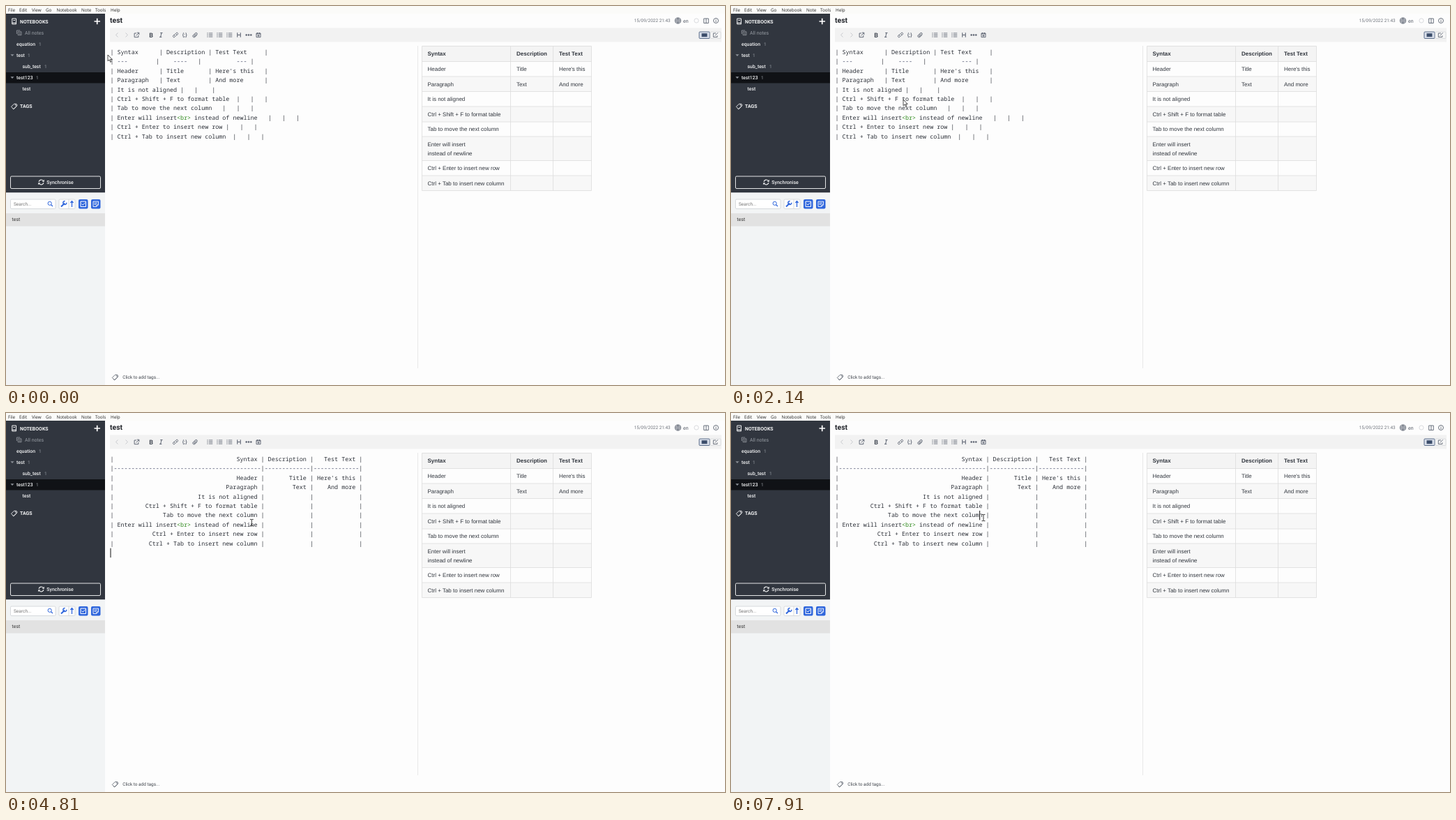
These frames come from a looping animation (1031x543 px, 8 s). An HTML page:

```html
<!DOCTYPE html>
<html lang="en">
<head>
<meta charset="utf-8">
<title>Table formatting</title>
<style>
html, body { margin: 0; width: 100%; height: 100%; overflow: hidden; background: #fdfdfd; }
svg { display: block; width: 1031px; height: 543px; }
text { white-space: pre; text-rendering: geometricPrecision; }
.ui { font-family: Roboto, sans-serif; }
.menu { font-family: "Open Sans", sans-serif; }
.cell { font-family: "Liberation Sans", Arial, sans-serif; }
.code { font-family: "Noto Sans Mono", "Liberation Mono", monospace; }
</style>
</head>
<body>
<svg id="stage" viewBox="0 0 1031 543" xmlns="http://www.w3.org/2000/svg"></svg>
<script>
const LOOP = 8000;
const CHAR = 5.04, LINE = 13.44, LEFT = 149.5, TOP = 66;
const INK = '#2c3038', ICON = '#5b6270', BLUE = '#2f66dc';

const escape = s => s.replace(/&/g, '&amp;').replace(/</g, '&lt;').replace(/>/g, '&gt;');
const rect = (x, y, w, h, fill, more = '') =>
  `<rect x="${x}" y="${y}" width="${w}" height="${h}" fill="${fill}" ${more}/>`;
const line = (d, color, width = 1, more = '') =>
  `<path d="${d}" fill="none" stroke="${color}" stroke-width="${width}" ${more}/>`;
const shape = (d, fill) => `<path d="${d}" fill="${fill}"/>`;
const circle = (x, y, r, color, width = 0.8) =>
  `<circle cx="${x}" cy="${y}" r="${r}" fill="none" stroke="${color}" stroke-width="${width}"/>`;
const label = (s, x, y, size, fill, kind = 'ui', weight = 400) =>
  `<text x="${x}" y="${y}" class="${kind}" font-size="${size}" font-weight="${weight}" fill="${fill}">${escape(s)}</text>`;
const at = (x, y, body, scale = 1) => `<g transform="translate(${x} ${y}) scale(${scale})">${body}</g>`;

const tagIcon = color =>
  line('M-4 .5 0-3.5H3.5V0L-.5 4Z', color, 0.9) +
  line('M-2.2 2.6-1 4 4.5-1.2V-2.5', color, 0.8) + `<circle cx="1.9" cy="-1.9" r=".7" fill="${color}"/>`;
const bookIcon = color =>
  line('M-2.7-4H3V4H-2.7Z', color, 1) + line('M-3 2.2H3M-1-1.5H1.5', color, 1);
const syncIcon = color =>
  line('M-3.4-.6A3.5 3.5 0 0 1 3-1.8M3.4 .6A3.5 3.5 0 0 1-3 1.8', color, 1.1) +
  shape('M4.3-3.8V-.8H1.3ZM-4.3 3.8V.8H-1.3Z', color);

function menuBar() {
  const items = { File: 3, Edit: 19, View: 37, Go: 57, Notebook: 72.5, Note: 108, Tools: 128, Help: 150 };
  return rect(0, 0, 1031, 11, '#fbfbf9') +
    Object.entries(items).map(([s, x]) => label(s, x, 7.6, 6.3, '#222', 'menu')).join('');
}

function sidebar() {
  const white = '#f2f3f4', grey = '#989da4';
  const item = (s, x, y, count) => label(s, x, y, 6.9, white, 'ui', 500) +
    (count ? label('1', count, y + .1, 6.5, grey) : '');
  const fold = y => shape(`M6.5 ${y - 1.3}H11.5L9 ${y + 1.5}Z`, '#8d929a');
  return rect(0, 11, 142, 256.5, '#31363f') + rect(0, 95, 142, 15.5, '#101216') +
    at(11.5, 22, bookIcon(white)) + label('NOTEBOOKS', 20, 24.5, 7, white, 'ui', 700) +
    line('M126.5 22H135M130.7 17.8V26.2', '#fff', 1.7) +
    at(18.7, 38.5, line('M-1.5-1.7H3.3V3.2H-1.5ZM-3.3 1.5V-3.5H1.5M0 .2H2M0 1.7H2', grey, .8)) +
    label('All notes', 27, 41, 7, grey) +
    item('equation', 15, 57, 47) + fold(70.5) + item('test', 15, 73, 31) +
    item('sub_test', 23.5, 89, 55) + fold(102.5) + item('test123', 15, 105, 43) + item('test', 23.5, 121) +
    at(11.5, 143.8, tagIcon(white)) + label('TAGS', 20, 146.3, 7, white, 'ui', 700) +
    rect(6.5, 244, 129, 17.5, 'none', 'rx="1.5" stroke="#e4e5e6"') +
    at(50.5, 252.5, syncIcon(white)) + label('Synchronise', 58.3, 255.1, 7, white, 'ui', 500);
}

function noteList() {
  const border = 'stroke="#cfd2d6" stroke-width=".8" rx="1.5"';
  return rect(0, 267.5, 142, 275.5, '#f2f4f5') + rect(0, 297, 142, 18.5, '#e2e2e2') +
    rect(6.5, 277, 64.5, 13.5, '#fff', border) + label('Search...', 11, 286, 6.5, '#777') +
    circle(62.7, 282.8, 2.6, BLUE, 1) + line('M64.6 284.7 67 287', BLUE, 1.2) +
    rect(76, 277, 23, 13.5, '#fff', border) + line('M90 277V290.5', '#cfd2d6', .8) +
    line('M79 287.5 84.2 282.5', BLUE, 2) +
    line('M86.8 281.8A2.5 2.5 0 1 1 84.6 279.5', BLUE, 1.5) +
    line('M94.5 288V280M92.4 282 94.5 279.6 96.6 282', BLUE, 1.3) +
    rect(104, 277, 13.5, 13.5, BLUE, 'rx="2"') + rect(122, 277, 13.5, 13.5, BLUE, 'rx="2"') +
    line('M107 280H114.5V287.5H107ZM108.7 283.5 110.3 285.2 113.5 281.8', '#fff', 1) +
    line('M125 280H132.5V284.8L129.8 287.5H125ZM126.5 282.3H131M126.5 284.3H129M129.8 287.3V284.8H132.3', '#fff', .9) +
    label('test', 8.5, 308.3, 6.9, '#333');
}

function header() {
  return label('test', 149, 24.4, 10.4, '#22252b', 'ui', 700) +
    label('15/09/2022 21:43', 900.7, 23.2, 6.46, '#70757d') +
    at(963.5, 21, circle(0, 0, 4.1, ICON, .9) +
      line('M-4 0H4M0-4V4M-3.5-2H3.5M-3.5 2H3.5M0-4C-2.8-1-2.8 1 0 4C2.8 1 2.8-1 0-4', ICON, .7)) +
    label('en', 971, 23.5, 7, '#555b66') + circle(990, 21, 3.1, '#dadcdf', 1) +
    line('M1000.7 18H1007.3V24.5H1000.7ZM1004 18V24.5', ICON, .9) +
    circle(1018, 21, 3.5, ICON, .9) + line('M1018 20.4V23M1018 18.8V19.6', ICON, .9);
}

function toolbar() {
  const faint = '#c4c7cb', y = 41.5;
  const icon = (x, d, color = ICON, w = .95) => at(x, y, line(d, color, w));
  const bullets = x => icon(x, 'M-1.5-2.5H4M-1.5 0H4M-1.5 2.5H4') +
    icon(x, 'M-4-2.5H-2.7M-4 0H-2.7M-4 2.5H-2.7', ICON, 1.2);
  return rect(149, 31.5, 877, 20, '#f2f2f2') +
    icon(159, 'M1.5-3-1.5 0 1.5 3', faint) + icon(173, 'M-1.5-3 1.5 0-1.5 3', faint) +
    icon(187.3, 'M-.3-2.5H-3.2V3.2H2.5V.5M.5-3.3H3.5V-.3M3.3-3-.8 1') +
    label('B', 205.3, 44.8, 9, '#444a55', 'ui', 700) +
    at(222.3, y, line('M-1-3H2.2M-2.2 3H1M.7-3-.7 3', ICON, 1)) +
    icon(243, 'M-.8 1.4C-2.4 1-1.6-.4-.8-1L1-2.8C3-4.3 4.5-1.8 3-.7L2 .4M.8-1.4C2.4-1 1.6.4.8 1L-1 2.8C-3 4.3-4.5 1.8-3 .7L-2-.4') +
    label('{;}', 252.8, 44, 7.6, ICON, 'ui', 500) +
    icon(271, 'M3.3-.4-.2 3C-2.4 4.4-4.2 1.8-2.7.3L.7-2.8C2.3-4 4-2 2.7-.7L-.4 2C-1.5 2.5-2 1.5-1.2.7L1.3-1.6') +
    bullets(292.3) + bullets(306.3) + bullets(320.3) +
    icon(334, 'M-2.2-3.2V3.2M2.2-3.2V3.2M-2.2 0H2.2', ICON, 1.1) +
    [344.7, 348, 351.3].map(x => `<circle cx="${x}" cy="${y}" r="1.3" fill="${ICON}"/>`).join('') +
    icon(362, 'M-3-2.5H3V3.2H-3ZM-3-1.5H3M-1.5-3.5V-2M1.5-3.5V-2M-1.5 1H1.5M0-.5V2.5') +
    rect(994, 37, 15, 9.5, '#dbe1ec', 'rx="1" stroke="#4d607f" stroke-width=".9"') +
    rect(997.5, 39.2, 8, 5, '#3c4e6b') +
    rect(1010, 37, 15, 9.5, '#f7f7f7', 'rx="1" stroke="#d4d6d9" stroke-width=".8"') +
    at(1017.5, y, line('M.5-2.5H-3.2V3H2.4V.8M-1 1.2 3.4-3.2', ICON, .9));
}

function preview() {
  const edges = [57.5, 79.5, 101, 122.5, 144, 166, 187, 221.5, 243, 264.5];
  const rows = [
    ['Syntax', 'Description', 'Test Text'], ['Header', 'Title', "Here's this"], ['Paragraph', 'Text', 'And more'],
    ['It is not aligned'], ['Ctrl + Shift + F to format table'], ['Tab to move the next column'],
    ['Enter will insert\ninstead of newline'], ['Ctrl + Enter to insert new row'], ['Ctrl + Tab to insert new column']
  ];
  const xs = [604.5, 732, 793];
  let out = '';
  rows.forEach((row, r) => {
    const y = edges[r], h = edges[r + 1] - y;
    if (r % 2 === 0) out += rect(596.5, y, 243, h, r ? '#f7f7f7' : '#f4f4f4');
    row.forEach((s, c) => s.split('\n').forEach((part, k, all) => {
      const base = y + h / 2 + 2.8 + (k - (all.length - 1) / 2) * 13;
      out += label(part, xs[c], base, 8, '#32373f', 'cell', r ? 400 : 700);
    }));
  });
  const grid = edges.map(y => `M596.5 ${y}H839.5`).join('') +
    [596.5, 723.5, 784.5, 839.5].map(x => `M${x} 57.5V264.5`).join('');
  return line('M590.5 57V519', '#e9e9e9') + out + line(grid, '#dcdcdc', .8);
}

const footer = () => at(156.3, 532, tagIcon('#646a74')) + label('Click to add tags...', 167.2, 534.4, 6.46, '#40454d');

const loose = [
  '| Syntax      | Description | Test Text     |',
  '| ---        |    ----   |          --- |',
  "| Header      | Title       | Here's this   |",
  '| Paragraph   | Text        | And more      |',
  '| It is not aligned |   |    |',
  '| Ctrl + Shift + F to format table  |   |   |',
  '| Tab to move the next column   |   |   |',
  '| Enter will insert<br> instead of newline   |   |   |',
  '| Ctrl + Enter to insert new row |   |   |',
  '| Ctrl + Tab to insert new column  |   |   |'
];
const widths = [40, 11, 11];
const aligned = loose.map((row, r) => {
  const cells = row.split('|').slice(1, 4).map(s => s.trim());
  return '|' + cells.map((s, c) => r === 1 ? '-'.repeat(widths[c] + 2) : ` ${s.padStart(widths[c])} `).join('|') + '|';
});

function editor(rows) {
  return rows.map((s, r) => {
    const body = escape(s).replace('&lt;br&gt;', '<tspan fill="#2f8a1c">&lt;br&gt;</tspan>')
      .replace(/-{3,}/g, '<tspan fill="#454a68">$&</tspan>');
    return `<text x="${LEFT}" y="${TOP + r * LINE + 2.8}" class="code" font-size="8.4" font-weight="500" fill="${INK}">${body}</text>`;
  }).join('');
}

const stage = document.getElementById('stage');
stage.innerHTML = rect(0, 0, 1031, 543, '#fdfdfd') + menuBar() + sidebar() + noteList() + header() + toolbar() +
  preview() + footer() + `<g id="loose">${editor(loose)}</g><g id="aligned">${editor(aligned)}</g>` +
  `<g id="caret">${line('M0-6.7V6.7', '#111', 1)}</g>` +
  `<g id="arrow"><path d="M0 0V8.8L2.1 7 3.7 10.4 5 9.8 3.5 6.5H6.2Z" fill="#fff" stroke="#222" stroke-width=".8"/></g>` +
  `<g id="beam">${line('M-2.4-4.6H-.5L0-4.1.5-4.6H2.4M-2.4 4.6H-.5L0 4.1.5 4.6H2.4M0-4.1V4.1', '#222', .9)}</g>`;
const part = Object.fromEntries(['loose', 'aligned', 'caret', 'arrow', 'beam'].map(id => [id, document.getElementById(id)]));

// Pointer path: time, x, y
const path = [
  [0, 146, 70], [40, 146, 70], [270, 147, 74], [840, 212, 112], [870, 212, 112], [1170, 255, 130],
  [1420, 350, 225], [1690, 443, 309], [2000, 233, 140], [2140, 247, 134], [2240, 247, 134], [2310, 246, 134],
  [2540, 246, 134], [2840, 482, 309], [3240, 341, 150], [3370, 341, 150], [3520, 301, 135], [3710, 308.7, 139],
  [4140, 308.7, 139], [4240, 349, 157], [4640, 349, 157], [5440, 377, 157], [5480, 377, 157], [5810, 379, 154],
  [5980, 379, 154], [6410, 382, 151], [6740, 382, 151], [6980, 397, 153], [7510, 397, 153], [7880, 362, 150],
  [LOOP, 362, 150]
];
// Caret stays: from, to, column, row
const carets = [
  [3520, 4140, 30, 5], [4640, 4700, 30, 5], [4700, 5230, 0, 10], [5760, 6290, 0, 10],
  [6290, 6820, 46, 6], [7270, 7850, 46, 6], [7850, LOOP, 41, 6]
];
const FORMAT = 4700, BEAM = 3370;

function pointer(t) {
  const i = Math.max(1, path.findIndex(p => p[0] > t));
  const [t0, x0, y0] = path[i - 1], [t1, x1, y1] = path[i];
  const k = (t - t0) / (t1 - t0), e = k * k * (3 - 2 * k);
  return [x0 + (x1 - x0) * e, y0 + (y1 - y0) * e];
}
const show = (el, on) => el.setAttribute('visibility', on ? 'visible' : 'hidden');
const move = (el, x, y) => el.setAttribute('transform', `translate(${x.toFixed(2)} ${y.toFixed(2)})`);

function draw(t) {
  const [x, y] = pointer(t);
  show(part.loose, t < FORMAT);
  show(part.aligned, t >= FORMAT);
  show(part.arrow, t < BEAM);
  show(part.beam, t >= BEAM);
  move(part.arrow, x, y);
  move(part.beam, x, y);
  const spot = carets.find(c => t >= c[0] && t < c[1]);
  show(part.caret, !!spot);
  if (spot) move(part.caret, LEFT + .5 + spot[2] * CHAR, TOP + spot[3] * LINE);
}

const start = performance.now();
function tick() {
  draw((performance.now() - start) % LOOP);
  requestAnimationFrame(tick);
}
draw(0);
tick();
</script>
</body>
</html>
```
